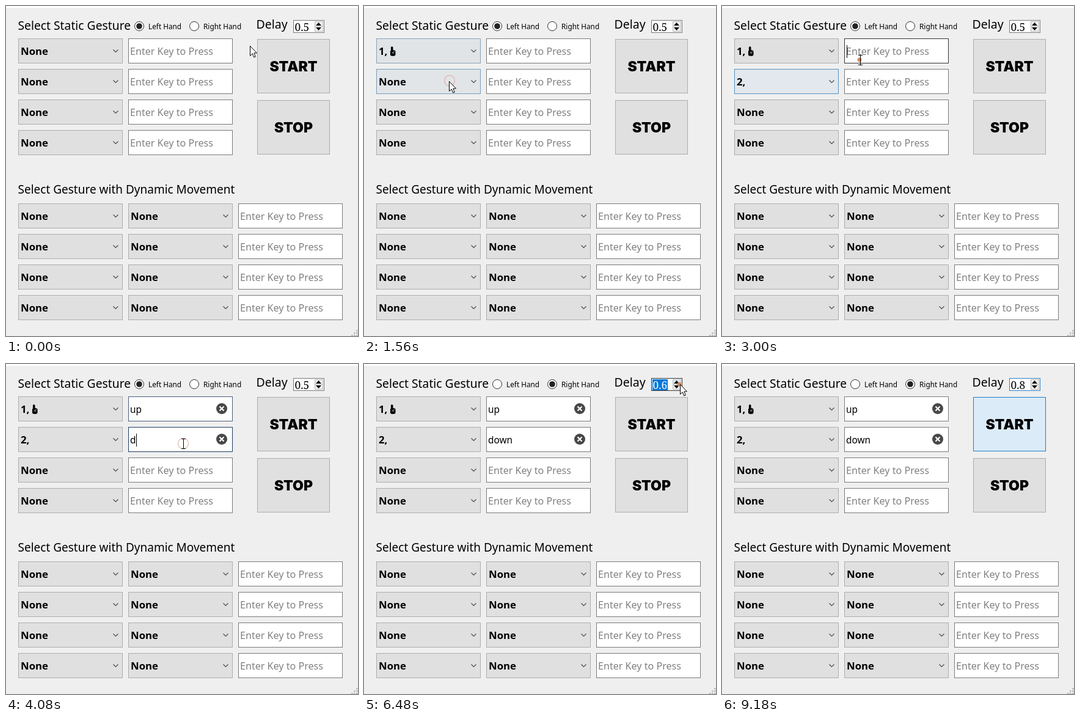
An HTML page with a canvas for the animation above (9.24 s loop, 576 by 540 pixels).

```html
<!DOCTYPE html>
<html lang="en">
<head>
<meta charset="utf-8">
<title>Gesture settings</title>
<style>
  html, body { margin: 0; width: 100%; height: 100%; overflow: hidden; background: #efefef; }
  canvas { display: block; }
</style>
</head>
<body>
<canvas id="stage" width="576" height="540"></canvas>
<script>
const ctx = document.getElementById('stage').getContext('2d');
const LOOP = 9240;
const SANS = '"Noto Sans", "Open Sans", sans-serif';
const BOLD = 'bold 16.8px ' + SANS;
const ITEMS = [['None'], ['1, ', 'point'], ['2,'], ['3,', 'finger'], ['4'], ['5,', 'palm'],
  ['Thumb Right'], ['Thumb Left'], ['Fist,', 'fist'], ['Victory, ', 'victory']];

// Pointer path: time, x, y
const PATH = [[60, 399, 65], [850, 146, 78], [1150, 146, 78], [1380, 140, 122], [1500, 140, 122],
  [1720, 133, 128], [2000, 133, 128], [2300, 128, 199], [2450, 128, 199], [2850, 226, 88],
  [3500, 226, 88], [3800, 290, 130], [4920, 290, 130], [5220, 358, 43], [5550, 308, 35],
  [5800, 308, 35], [6250, 517, 33], [7050, 517, 33], [7650, 478, 118], [8280, 478, 118], [8700, 545, 185]];
const CLICKS = [935, 1420, 1780, 2380, 2960, 3850, 5620, 6440, 6690, 6940, 8070];
const POPUPS = [{ open: 935, close: 1420, y: 94 }, { open: 1780, close: 2380, y: 144 }];

const clamp = v => Math.max(0, Math.min(1, v));
const pulse = (t, start, end, fade) => clamp((t - start) / fade) * (1 - clamp((t - end) / fade));
const typed = (word, t, start, step) => word.slice(0, Math.max(0, Math.floor((t - start) / step) + 1));
const mix = (a, b, k) => `rgb(${a.map((v, i) => Math.round(v + (b[i] - v) * k))})`;

function pointer(t) {
  if (t <= PATH[0][0]) return PATH[0].slice(1);
  const i = PATH.findIndex(p => p[0] > t);
  if (i < 0) return PATH[PATH.length - 1].slice(1);
  const [t0, x0, y0] = PATH[i - 1], [t1, x1, y1] = PATH[i];
  const k = (t - t0) / (t1 - t0), e = k * k * (3 - 2 * k);
  return [x0 + (x1 - x0) * e, y0 + (y1 - y0) * e];
}

function text(str, x, y, font, color = '#000', align = 'left') {
  ctx.font = font;
  ctx.fillStyle = color;
  ctx.textAlign = align;
  ctx.fillText(str, x, y);
}

function rect(x, y, w, h, fill) {
  ctx.fillStyle = fill;
  ctx.fillRect(x, y, w, h);
}

function box(x, y, w, h, fill, border) {
  rect(x, y, w, h, border);
  rect(x + 1, y + 1, w - 2, h - 2, fill);
}

function line(points, color, width = 1) {
  ctx.beginPath();
  points.forEach(([x, y]) => ctx.lineTo(x, y));
  ctx.strokeStyle = color;
  ctx.lineWidth = width;
  ctx.stroke();
}

function polygon(points, fill) {
  ctx.beginPath();
  points.forEach(([x, y]) => ctx.lineTo(x, y));
  ctx.closePath();
  ctx.fillStyle = fill;
  ctx.fill();
}

function circle(x, y, r, fill, stroke, width = 1) {
  ctx.beginPath();
  ctx.arc(x, y, r, 0, 7);
  if (fill) { ctx.fillStyle = fill; ctx.fill(); }
  if (stroke) { ctx.strokeStyle = stroke; ctx.lineWidth = width; ctx.stroke(); }
}

// Rounded parts with a shared outline: [x, y, w, h, radius]
function parts(list, fill, outline) {
  ctx.beginPath();
  list.forEach(p => ctx.roundRect(...p));
  ctx.strokeStyle = outline;
  ctx.lineWidth = 1.6;
  ctx.stroke();
  ctx.fillStyle = fill;
  ctx.fill();
}

function hand(kind, x, y) {
  const skin = '#fcbd3c', edge = '#54401c';
  ctx.save();
  ctx.translate(x, y);
  if (kind === 'point') {
    parts([[2, -7, 2, 9, 1], [1, -1, 7, 8, 2]], '#000', '#000');
    line([[4.5, 1], [5, 4]], '#fff');
    line([[6, 0], [7, 1]], '#fff');
  } else if (kind === 'victory') {
    parts([[2, -6, 1.5, 8, 1], [6.5, -6, 1.5, 8, 1], [2, 0, 7, 6, 2]], '#000', '#000');
    line([[4, 2], [6, 3], [5, 5]], '#fff');
  } else if (kind === 'finger') {
    parts([[5, -9, 3.5, 13, 1.7], [2, -1, 14, 9, 4]], skin, edge);
    line([[9, 0], [9, 3]], '#c8841c');
    line([[12, 0], [12, 3]], '#c8841c');
  } else if (kind === 'palm') {
    parts([[1, -6, 3, 10, 1.5], [4, -9, 3, 12, 1.5], [7, -9, 3, 12, 1.5], [10, -7, 3, 11, 1.5],
      [1, -1, 13, 10, 4], [12, 0, 5, 5, 2.5]], skin, edge);
    line([[8, 5], [10, 2], [13, 1]], '#c8841c');
  } else if (kind === 'fist') {
    parts([[1, -7, 14, 15, 5]], skin, edge);
    [5, 8, 11].forEach(v => line([[v, -6], [v, -1]], '#b87818'));
    line([[3, 0], [10, 0], [9, 4]], '#b87818');
  }
  ctx.restore();
}

function item([label, icon], x, y, color) {
  text(label, x, y + 6, BOLD, color);
  if (icon) hand(icon, x + ctx.measureText(label).width, y);
}

function chevron(x, y, dir, color, width) {
  line([[x - 4, y - 2 * dir], [x, y + 2 * dir], [x + 4, y - 2 * dir]], color, width);
}

function combo(x, y, entry = ITEMS[0], hover = 0) {
  box(x, y, 171, 41, mix([224, 224, 224], [229, 241, 251], hover), mix([173, 173, 173], [0, 120, 215], hover));
  item(entry, x + 4, y + 21, '#000');
  chevron(x + 159.5, y + 20.5, 1, '#484848', 1.1);
}

function field(x, y, value = '', border = '#7a7a7a', focused = false) {
  box(x, y, 171, 41, '#fff', border);
  const font = (value ? 15.4 : 16.1) + 'px ' + SANS;
  text(value || 'Enter Key to Press', x + 3, y + 27, font, value ? '#000' : '#808080');
  if (focused) rect(Math.round(x + 3.5 + (value ? ctx.measureText(value).width : 0)), y + 11, 1, 21, '#000');
  if (!value) return;
  const cx = x + 153, cy = y + 20;
  circle(cx, cy, 9, '#484848');
  line([[cx - 3.5, cy - 3.5], [cx + 3.5, cy + 3.5]], '#fff', 2.2);
  line([[cx + 3.5, cy - 3.5], [cx - 3.5, cy + 3.5]], '#fff', 2.2);
}

function radio(x, label, on) {
  circle(x, 33, 7.5, '#fff', '#333');
  if (on) circle(x, 33, 4.8, '#222');
  text(label, x + 15, 38, '11.8px ' + SANS);
}

function button(y, label, fill, border) {
  box(411, y, 119, 89, fill, border);
  text(label, 470.5, y + 53, '900 23px Inter, "Liberation Sans", sans-serif', '#000', 'center');
}

function spinner(t) {
  const steps = [6440, 6690, 6940].filter(s => t >= s).length;
  const selected = steps > 0 && t < 8070;
  const border = t < 6250 ? '#7a7a7a' : t < 7150 ? '#333' : '#2f7fc4';
  box(470, 23, 51, 21, '#fff', border);
  if (selected) rect(472, 25, 25, 18, '#0078d7');
  text('0.' + (5 + steps), 472.5, 41, '17.3px "Noto Serif", serif', selected ? '#fff' : '#000');
  box(505, 25, 14, 9, t > 6220 && t < 7150 ? '#d9ebf9' : '#f0f0f0', '#b8b8b8');
  box(505, 33, 14, 9, '#f0f0f0', '#b8b8b8');
  polygon([[507, 32], [511.5, 27], [516, 32]], '#000');
  polygon([[507, 35], [511.5, 40], [516, 35]], '#000');
}

function popup({ open, close, y }, t, py) {
  if (t < open || t >= close) return;
  const height = 221, shown = clamp((t - open) / 150);
  const offset = Math.round((shown - 1) * height);
  ctx.save();
  ctx.shadowColor = 'rgba(0,0,0,.55)';
  ctx.shadowBlur = 4;
  ctx.shadowOffsetX = ctx.shadowOffsetY = 3;
  rect(22, y + 2, 168, height - 2, '#efefef');
  ctx.restore();

  ctx.save();
  ctx.beginPath();
  ctx.rect(20, y, 172, height);
  ctx.clip();
  ctx.translate(0, y + offset);
  box(20, 0, 171, height, '#fff', '#646464');
  const hovered = py > y ? Math.min(9, Math.floor((py - y) / 22)) : 0;
  ITEMS.forEach((entry, i) => {
    const active = i === hovered;
    if (active) rect(21, 1 + 22 * i, 148, 20, shown < 1 ? '#f2f2f2' : '#0078d7');
    item(entry, 24, 11 + 21.95 * i, active && shown === 1 ? '#fff' : '#000');
  });
  rect(169, 1, 21, height - 2, '#f0f0f0');
  rect(170, 21, 19, 145, '#cdcdcd');
  chevron(179.5, 10.5, -1, '#505050', 1.8);
  chevron(179.5, 209.5, 1, '#505050', 1.8);
  ctx.restore();
}

function drawPointer(t, x, y, popupOpen) {
  for (const start of CLICKS) {
    const age = t - start;
    if (age < 0 || age > 320) continue;
    const [cx, cy] = pointer(start);
    const grow = clamp((age - 30) / 100);
    ctx.globalAlpha = 1 - grow;
    circle(cx - 1, cy, 3 + 5 * grow, '#d08050');
    ctx.globalAlpha = 0.75 * grow * clamp((320 - age) / 100);
    circle(cx, cy, 3 + 5.5 * grow, null, '#d8a8a0', 1.5);
    ctx.globalAlpha = 1;
  }
  if (t > 8700) return;
  ctx.save();
  ctx.translate(Math.round(x), Math.round(y));
  const inField = x > 200 && x < 371 && y > 53 && y < 244;
  if (inField && !popupOpen) {
    line([[.5, -7], [.5, 8]], '#000');
    line([[-3, -7.5], [4, -7.5]], '#000');
    line([[-3, 8.5], [4, 8.5]], '#000');
  } else {
    const arrow = [[.5, .5], [.5, 16.5], [4.2, 13], [6.8, 19], [9.3, 18], [6.8, 12], [11.5, 12]];
    polygon(arrow, '#fff');
    line([...arrow, arrow[0]], '#000');
  }
  ctx.restore();
}

function draw(t) {
  const [x, y] = pointer(t);
  rect(0, 0, 576, 540, '#efefef');
  rect(0, 0, 576, 3, '#fff');

  text('Select Static Gesture', 19.5, 39, '19.3px ' + SANS);
  text('Select Gesture with Dynamic Movement', 19.5, 307, '19px ' + SANS);
  text('Delay', 409.5, 37, '19.5px ' + SANS);
  radio(218, 'Left Hand', t < 5620);
  radio(308, 'Right Hand', t >= 5620);
  spinner(t);

  combo(20, 53, ITEMS[t < 1420 ? 0 : 1], pulse(t, 780, 1420, 180));
  combo(20, 103, ITEMS[t < 2380 ? 0 : 2], pulse(t, 1440, 2800, 400));
  field(200, 53, typed('up', t, 3240, 120),
    t < 2900 || t > 5700 ? '#7a7a7a' : t < 3850 ? '#333' : '#4a5f78', t >= 2960 && t < 3850);
  field(200, 103, typed('down', t, 4080, 130),
    t < 3800 || t > 5700 ? '#7a7a7a' : '#1f3d63', t >= 3850 && t < 5620);
  for (const row of [153, 203]) {
    combo(20, row);
    field(200, row);
  }
  for (let row = 323; row < 500; row += 50) {
    combo(20, row);
    combo(200, row);
    field(380, row);
  }

  const hover = clamp((t - 7400) / 250);
  button(54, 'START', mix([224, 224, 224], [219, 235, 248], hover), mix([173, 173, 173], [30, 126, 200], hover));
  button(154, 'STOP', '#e0e0e0', '#adadad');

  for (let i = 0; i < 3; i++)
    for (let j = 0; j <= i; j++) rect(573 - 4 * j, 530 + 4 * i, 2.5, 2.5, '#b8b8b8');

  POPUPS.forEach(p => popup(p, t, y));
  drawPointer(t, x, y, POPUPS.some(p => t >= p.open && t < p.close));
}

function tick() {
  draw(performance.now() % LOOP);
  requestAnimationFrame(tick);
}
tick();
</script>
</body>
</html>
```
